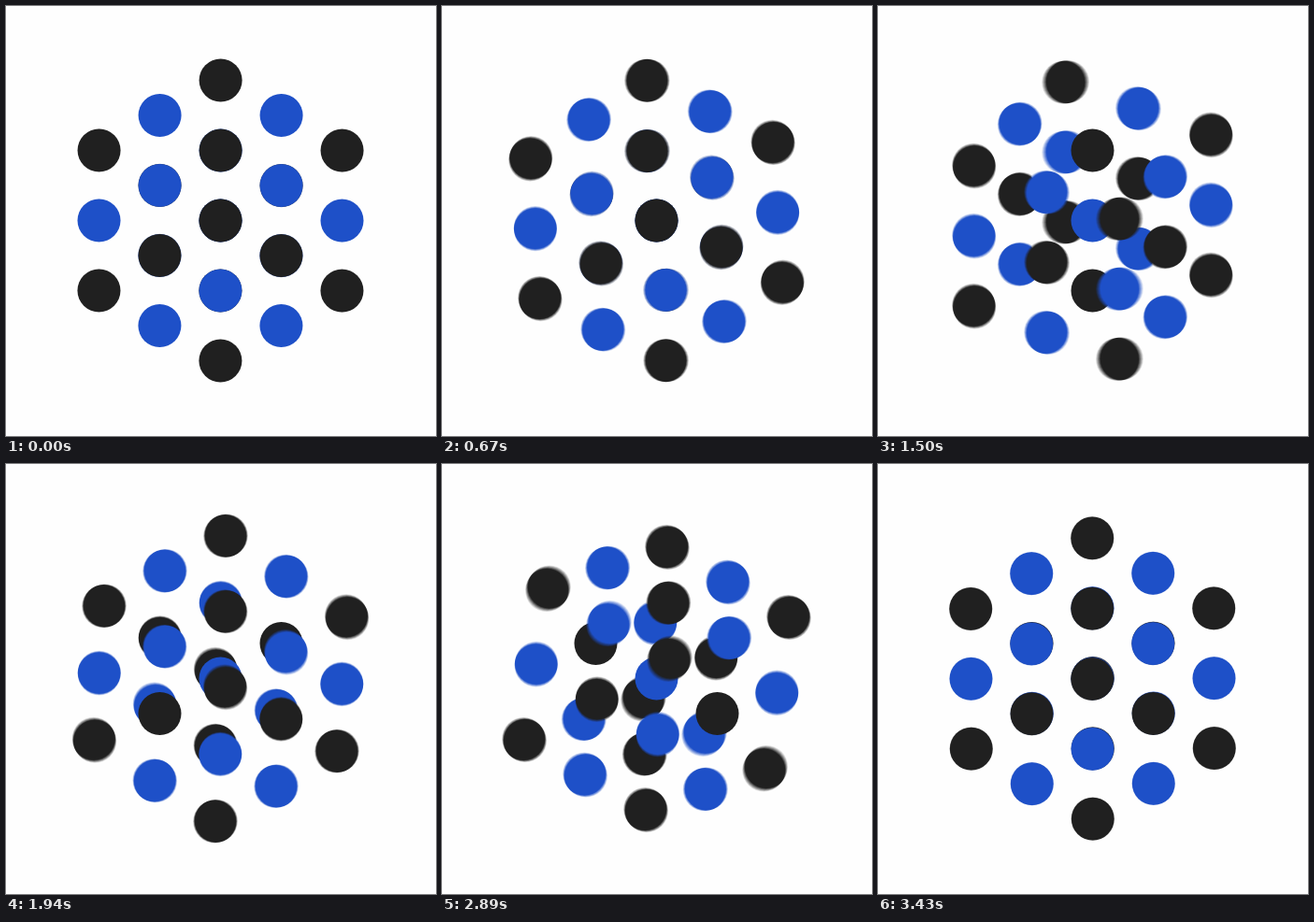
Write an HTML page with a canvas that moves like this. It is 460x460 px and loops after 3460 ms.

```html
<!DOCTYPE html>
<html lang="en">
<head>
<meta charset="utf-8">
<title>Turning lattice</title>
<style>
  html, body { margin: 0; width: 100%; height: 100%; overflow: hidden; background: #fefefe; }
  canvas { display: block; width: 460px; height: 460px; }
</style>
</head>
<body>
<canvas id="stage" width="460" height="460"></canvas>
<script>
const SIZE = 460, CENTER = 229.5, RADIUS = 23;
const PAPER = '#fefefe', INK = '#202020', BLUE = '#1e50c8';
const UNIT_X = 65, UNIT_Y = 75;      // isometric projection of one lattice step
const HOLD = 200, STEP = 30, STEPS = 24, MOVE = HOLD + (STEPS - 1) * STEP;
const LOOP = 4 * MOVE - 100;         // the first hold is only half as long
const SHUTTER = 0.6, SAMPLES = 8;

const stage = document.getElementById('stage').getContext('2d');
const layer = document.createElement('canvas');
layer.width = layer.height = SIZE;
const pen = layer.getContext('2d');

// 3 x 3 x 3 lattice, coloured like a checkerboard
const dots = [];
for (let x = -1; x <= 1; x++)
  for (let y = -1; y <= 1; y++)
    for (let z = -1; z <= 1; z++)
      dots.push({ at: [x, y, z], color: (x + y + z) % 2 ? INK : BLUE });

const ease = p => p * p * (3 - 2 * p);

function rotate(a, b, angle) {
  const c = Math.cos(angle), s = Math.sin(angle);
  return [a * c - b * s, a * s + b * c];
}

// quarter turn of the lattice about one of its own axes
function turn(point, axis, angle) {
  const i = (axis + 1) % 3, j = (axis + 2) % 3, out = [...point];
  [out[i], out[j]] = rotate(point[i], point[j], angle);
  return out;
}

function project([x, y, z]) {
  return { x: (x - y) * UNIT_X, y: ((x + y) / 2 - z) * UNIT_Y, depth: x + y + z };
}

// flat spin: the inner ring goes twice as far as the outer one
function spin(p, amount) {
  const angle = amount * Math.PI / 3 * (Math.hypot(p.x, p.y) < 100 ? 2 : 1);
  const [x, y] = rotate(p.x, p.y, angle);
  return { x, y, depth: p.depth };
}

function drawPose(move, progress) {
  const amount = ease(progress);
  const place = at => move === 0
    ? spin(project(at), amount)
    : project(turn(at, 3 - move, amount * Math.PI / 2));
  const placed = dots.map(d => ({ ...place(d.at), color: d.color }));
  placed.sort((a, b) => a.depth - b.depth);

  pen.fillStyle = PAPER;
  pen.fillRect(0, 0, SIZE, SIZE);
  for (const p of placed) {
    pen.fillStyle = p.color;
    pen.beginPath();
    pen.arc(CENTER + p.x, CENTER + p.y, RADIUS, 0, 2 * Math.PI);
    pen.fill();
  }
}

function render(time) {
  const t = time % LOOP + HOLD / 2;
  const move = Math.floor(t / MOVE), local = t % MOVE;
  const step = local < HOLD ? 0 : Math.floor((local - HOLD) / STEP) + 1;

  // motion blur: running average over the open shutter
  for (let i = 0; i < SAMPLES; i++) {
    drawPose(move, (step + SHUTTER * (i + 0.5) / SAMPLES) / STEPS);
    stage.globalAlpha = 1 / (i + 1);
    stage.drawImage(layer, 0, 0);
  }
}

function tick(now) {
  render(now);
  requestAnimationFrame(tick);
}
render(0);
requestAnimationFrame(tick);
</script>
</body>
</html>
```
